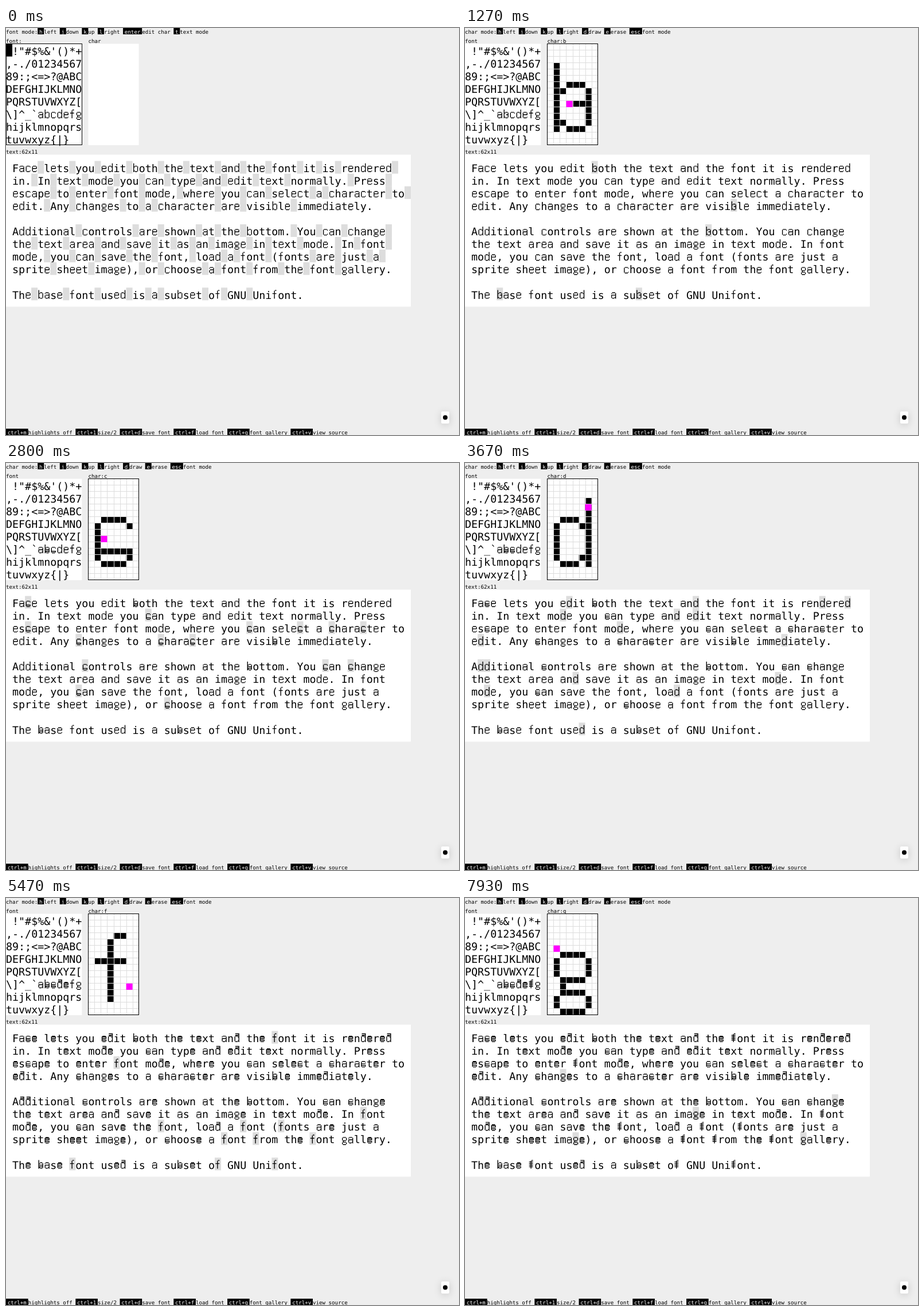
These frames come from a looping animation (790x709 px, 8 s). An HTML page with a canvas:

```html
<!DOCTYPE html>
<html lang="en">
<head>
<meta charset="utf-8">
<title>Font editor</title>
<style>
html, body { margin: 0; width: 100%; height: 100%; overflow: hidden; background: #eee; }
canvas { display: block; }
</style>
</head>
<body>
<canvas id="stage" width="790" height="709"></canvas>
<script>
const ctx = document.getElementById('stage').getContext('2d');
const U = 11.031;              // width of a large character
const LOOP = 8000, FPS = 15;
const FACE = '"DejaVu Sans Mono", "Liberation Mono", monospace';
const CHARS = Array.from({ length: 94 }, (_, i) => String.fromCharCode(32 + i));

const TEXT = [
  'Face lets you edit both the text and the font it is rendered ',
  'in. In text mode you can type and edit text normally. Press ',
  'escape to enter font mode, where you can select a character to ',
  'edit. Any changes to a character are visible immediately.',
  '',
  'Additional controls are shown at the bottom. You can change ',
  'the text area and save it as an image in text mode. In font ',
  'mode, you can save the font, load a font (fonts are just a ',
  'sprite sheet image), or choose a font from the font gallery.',
  '',
  'The base font used is a subset of GNU Unifont.'
];

const MOVES = [['h', 'left'], ['j', 'down'], ['k', 'up'], ['l', 'right']];
const FONT_HELP = [...MOVES, ['enter', 'edit char'], ['t', 'text mode']];
const CHAR_HELP = [...MOVES, ['d', 'draw'], ['e', 'erase'], ['esc', 'font mode']];
const FOOTER = [['ctrl+m', 'highlights off'], ['ctrl+1', 'size/2'], ['ctrl+d', 'save font'],
  ['ctrl+f', 'load font'], ['ctrl+g', 'font gallery'], ['ctrl+v', 'view source']];

// Editable letters as strokes on an 8 x 16 grid: left, top, right, bottom.
const row = (y, a, b) => [a, y, b, y];
const col = (x, a, b = a) => [x, a, x, b];
const flip = ([a, t, b, u]) => [7 - b, t, 7 - a, u];
const LETTERS = {
  a: [row(6, 2, 5), col(1, 7), col(6, 7, 13), row(9, 2, 5), col(1, 10, 12), col(5, 12), row(13, 2, 4)],
  c: [row(6, 2, 5), col(1, 7, 12), col(6, 7), col(6, 12), row(13, 2, 5)],
  d: [col(6, 3, 13), row(6, 2, 4), col(5, 7), col(1, 7, 12), col(5, 12), row(13, 2, 4)],
  f: [row(3, 4, 5), col(3, 4, 13), row(7, 1, 5)],
  g: [...[6, 10, 12, 15].map(y => row(y, 2, 5)), col(2, 11),
      ...[1, 6].flatMap(x => [col(x, 7, 9), col(x, 13, 14)])]
};
LETTERS.b = LETTERS.d.map(flip);
LETTERS.e = [...LETTERS.c, col(6, 8), row(9, 1, 6)];

// Key presses spread evenly between two steps; "." is enter, "<" is escape.
const SCRIPT = [
  [0, 7, '5j5l.9jl'],
  [7, 12, 'd5l'],
  [13, 29, '<l.4(dh)dh2j5(dl)'],
  [29, 32, 'd<'],
  [33, 34, 'l'],
  [34, 47, '.4(dh)d2k4(dl)d'],
  [47, 55, '<l.5k'],
  [55, 67, 'k4(dh)d2j4(dl)<l'],
  [67, 80, '.2j4(dh)d4j4(dl)d'],
  [80, 86, '<l.h6k'],
  [86, 95, '4(dh)d4j4(dl)dj'],
  [95, 98, 'j4(dh)d'],
  [98, 111, '<l.4ld'],
  [111, 119, 'e4h6k']
].map(([from, to, keys]) => ({ from, to, keys: expand(keys) }));

function expand(keys) {
  return keys.replace(/(\d)(?:\((\w+)\)|(\w))/g, (_, n, group, key) => (group || key).repeat(n));
}

function pixelsOf(strokes) {
  const set = new Set();
  for (const [left, top, right, bottom] of strokes)
    for (let y = top; y <= bottom; y++)
      for (let x = left; x <= right; x++) set.add(y * 8 + x);
  return set;
}

function stateAt(step) {
  const state = { editing: false, select: { x: 0, y: 0 }, pen: { x: 0, y: 0 }, glyphs: {} };
  for (const name in LETTERS) state.glyphs[name] = pixelsOf(LETTERS[name]);
  for (const { from, to, keys } of SCRIPT) {
    const part = Math.min(1, Math.max(0, (step - from) / (to - from)));
    for (const key of keys.slice(0, Math.floor(keys.length * part + 1e-6))) press(state, key);
  }
  state.char = charAt(state);
  return state;
}

function charAt({ select }) {
  return CHARS[select.y * 12 + select.x];
}

function press(state, key) {
  const cursor = state.editing ? state.pen : state.select;
  const glyph = state.glyphs[charAt(state)];
  const pixel = state.pen.y * 8 + state.pen.x;
  switch (key) {
    case 'h': cursor.x--; break;
    case 'l': cursor.x++; break;
    case 'k': cursor.y--; break;
    case 'j': cursor.y++; break;
    case 'd': glyph.add(pixel); break;
    case 'e': glyph.delete(pixel); break;
    case '.': state.editing = true; break;
    case '<': state.editing = false; break;
  }
}

function box(x, y, w, h, color) {
  ctx.fillStyle = color;
  ctx.fillRect(x, y, w, h);
}

function frame(x, y, w, h) {
  ctx.strokeStyle = '#000';
  ctx.strokeRect(Math.round(x) + .5, Math.round(y) - .5, Math.round(w), Math.round(h));
}

// Each character sits in its own cell, "width" wide and twice as high.
function write(text, x, y, width, color = '#000') {
  ctx.font = `${width / .60205}px ${FACE}`;
  ctx.fillStyle = color;
  [...text].forEach((c, i) => {
    if (c !== ' ') ctx.fillText(c, x + (i + .5) * width, y + width * 1.75);
  });
}

function label(text, x, y, color) {
  write(text, x, y, U / 2, color);
}

function drawPixels(pixels, x, y, size, color) {
  ctx.fillStyle = color;
  ctx.beginPath();
  for (const p of pixels) ctx.rect(x + p % 8 * size, y + (p >> 3) * size, size, size);
  ctx.fill();
}

function drawChar(state, c, x, y, color = '#000') {
  if (state.glyphs[c]) drawPixels(state.glyphs[c], x, y, U / 8, color);
  else write(c, x, y, U, color);
}

function drawHelp(title, items, y) {
  const w = U / 2;
  let x = title.length * w;
  label(title, 0, y);
  for (const [key, action] of items) {
    const keyWidth = (key.length + 1) * w;
    box(x, y, keyWidth, U, '#000');
    label(key, x + w / 2, y, '#fff');
    label(action, x + keyWidth, y);
    x += keyWidth + (action.length + 1) * w;
  }
}

function drawFontPanel(state) {
  const top = 2.5 * U;
  label(state.editing ? 'font' : 'font:' + state.char, 0, 1.5 * U);
  box(0, top, 12 * U, 16 * U, '#fff');
  CHARS.forEach((c, i) => {
    const x = i % 12 * U, y = top + Math.floor(i / 12) * 2 * U;
    const active = !state.editing && c === state.char;
    if (active) box(x, y, U, 2 * U, '#000');
    drawChar(state, c, x, y, active ? '#fff' : '#000');
  });
  if (!state.editing) frame(0, top, 12 * U, 16 * U);
}

function drawCharPanel(state) {
  const left = 13 * U, top = 2.5 * U;
  label(state.editing ? 'char:' + state.char : 'char', left, 1.5 * U);
  box(left, top, 8 * U, 16 * U, '#fff');
  drawPixels(state.glyphs[state.char] || [], left, top, U, '#000');
  if (!state.editing) return;
  for (let i = 1; i < 8; i++) box(Math.round(left + i * U), top, 1, 16 * U, '#ddd');
  for (let i = 1; i < 16; i++) box(left, Math.round(top + i * U) - 1, 8 * U, 1, '#ddd');
  box(left + state.pen.x * U, top + state.pen.y * U, U, U, '#f0f');
  frame(left, top, 8 * U, 16 * U);
}

function drawText(state) {
  const top = 20 * U;
  label('text:62x11', 0, 19 * U);
  box(0, top, 64 * U, 24 * U, '#fff');
  TEXT.forEach((line, r) => [...line].forEach((c, i) => {
    const x = (i + 1) * U, y = top + (2 * r + 1) * U;
    if (c === state.char) box(x, y, U, 2 * U, '#ddd');
    drawChar(state, c, x, y);
  }));
}

function drawBadge() {
  ctx.save();
  ctx.shadowColor = 'rgba(0,0,0,.16)';
  ctx.shadowBlur = 14;
  ctx.shadowOffsetY = 2;
  ctx.fillStyle = '#fff';
  ctx.beginPath();
  ctx.roundRect(759, 668, 14, 21, 2);
  ctx.fill();
  ctx.restore();
  ctx.fillStyle = '#000';
  ctx.beginPath();
  ctx.arc(766, 678.5, 4, 0, 2 * Math.PI);
  ctx.fill();
}

function draw(step) {
  const state = stateAt(step);
  ctx.textAlign = 'center';
  ctx.textRendering = 'geometricPrecision';
  ctx.lineWidth = 1;
  box(0, 0, 790, 709, '#eee');
  if (state.editing) drawHelp('char mode:', CHAR_HELP, 0);
  else drawHelp('font mode:', FONT_HELP, 0);
  drawFontPanel(state);
  drawCharPanel(state);
  drawText(state);
  drawHelp('', FOOTER, 709 - U);
  drawBadge();
}

let shown = -1;
function tick() {
  const step = Math.floor(performance.now() % LOOP * FPS / 1000 + .06);
  if (step !== shown) draw(shown = step);
  requestAnimationFrame(tick);
}
tick();
</script>
</body>
</html>
```
